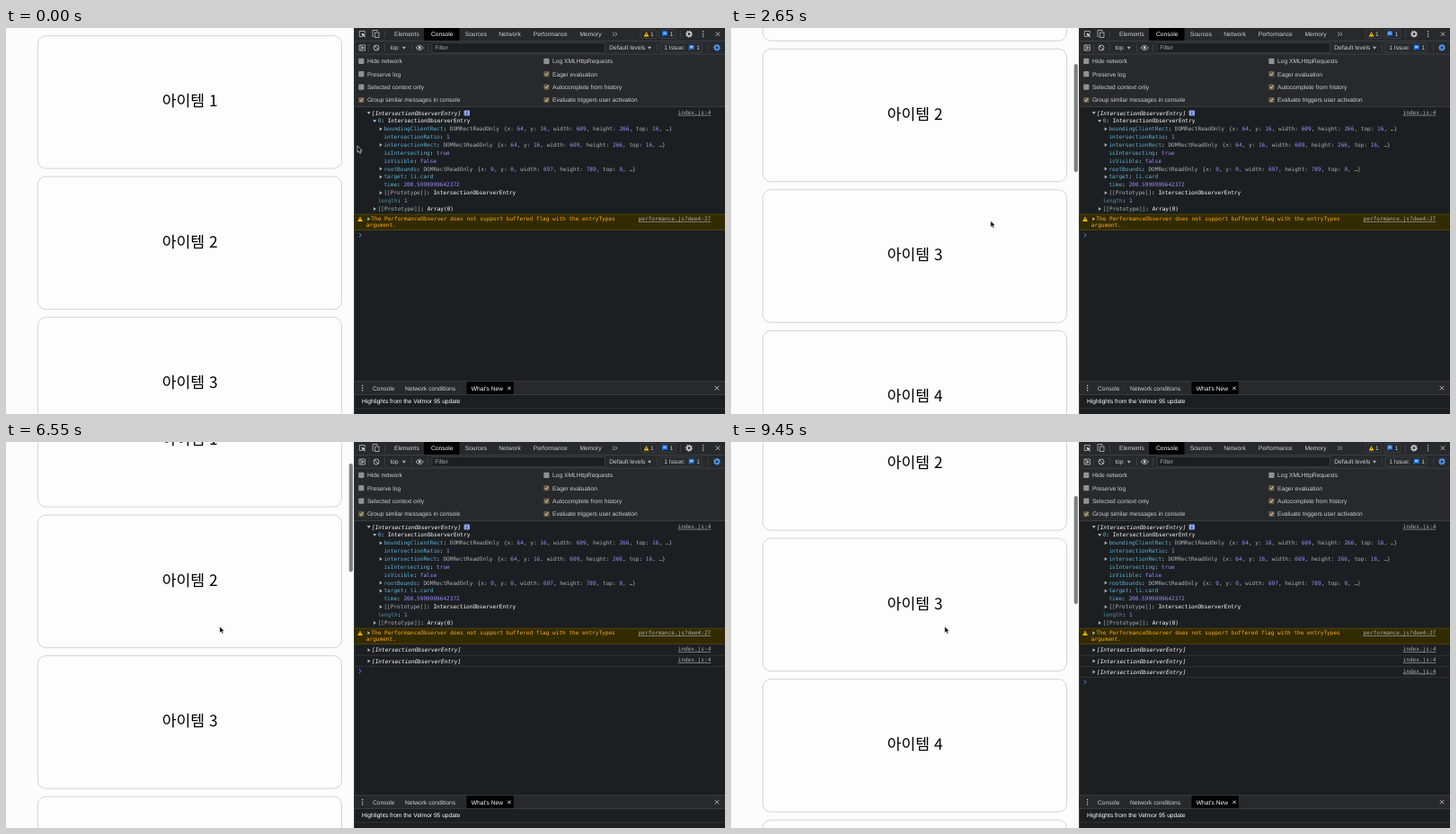
These frames come from a looping animation (800x429 px, 9.5 s). An HTML page:

```html
<!DOCTYPE html>
<html lang="ko">
<head>
<meta charset="utf-8">
<title>Scroll observer demo</title>
<style>
  html, body { margin: 0; width: 100%; height: 100%; overflow: hidden; background: #fcfcfc; }
  svg { display: block; width: 800px; height: 429px; }
  text { white-space: pre; text-rendering: geometricPrecision; }
  .ui { font: 6.66px "Liberation Sans", Arial, sans-serif; }
  .mono { font: 6.106px "DejaVu Sans Mono", Menlo, monospace; }
  .slant { font-style: italic; }
  .label { font: 500 17.2px "Noto Sans CJK KR", "Noto Sans CJK", sans-serif; text-anchor: middle; }
  .link { text-decoration: underline; text-anchor: end; }
</style>
</head>
<body>
<svg id="stage" viewBox="0 0 800 429" xmlns="http://www.w3.org/2000/svg"></svg>
<script>
const LOOP = 9500, STEP = 50;
const PITCH = 156.5, CARD_H = 147.5, GONE_AT = 156;
const ROW = 12.2, LINE = 8.88;
const C = {
  text: '#cdd0d4', white: '#ffffff', dim: '#adb1b6', key: '#5db0d7', faint: '#4c8dab',
  num: '#a18aff', bar: '#27292c', body: '#1c1f21', edge: '#494c50', blue: '#1a73e8',
  warn: '#fba82a', link: '#adb0b4'
};

// Drawing helpers
const rect = (x, y, w, h, fill, more = '') =>
  `<rect x="${x}" y="${y}" width="${w}" height="${h}" fill="${fill}" ${more}/>`;
const path = (d, stroke, width = .8, fill = 'none') =>
  `<path d="${d}" stroke="${stroke}" stroke-width="${width}" fill="${fill}"/>`;
const shape = (d, fill) => `<path d="${d}" fill="${fill}"/>`;
const ui = (x, y, s, fill = C.text) => `<text class="ui" x="${x}" y="${y}" fill="${fill}">${s}</text>`;
const mono = (x, y, s, fill = C.white, style = '') =>
  `<text class="mono ${style}" x="${x}" y="${y}" fill="${fill}">${s}</text>`;
const span = (s, fill, dx = 0) => `<tspan fill="${fill}" dx="${dx}">${s}</tspan>`;
const link = (y, s) => mono(784.3, y, s, C.link, 'link');
const right = (x, y, fill = C.dim) => shape(`M${x - 1.2} ${y - 2}L${x + 1.8} ${y}L${x - 1.2} ${y + 2}Z`, fill);
const down = (x, y, fill = C.dim) => shape(`M${x - 2} ${y - 1.3}H${x + 2}L${x} ${y + 1.7}Z`, fill);
const hline = (y, fill = C.edge) => rect(387.5, y, 412.5, .6, fill);
const vline = (x, y) => rect(x, y, .6, 9, C.edge);
const close = (x, y, r = 2.3, color = C.text) =>
  path(`M${x - r} ${y - r}L${x + r} ${y + r}M${x + r} ${y - r}L${x - r} ${y + r}`, color);
const dots = (x, y) => [-2.6, 0, 2.6].map(d => `<circle cx="${x}" cy="${y + d}" r=".75" fill="${C.text}"/>`).join('');
const ring = (x, y, r, color, width, more = '') =>
  `<circle cx="${x}" cy="${y}" r="${r}" fill="none" stroke="${color}" stroke-width="${width}" ${more}/>`;
const gear = (x, y, color) => ring(x, y, 2.2, color, 1.6) + ring(x, y, 3.4, color, 1.1, 'pathLength="16" stroke-dasharray="1"');
const outline = (x, y, w, h) => rect(x, y, w, h, 'none', `rx="1.2" stroke="${C.edge}" stroke-width=".6"`);
const alertIcon = (x, y, r) => shape(`M${x} ${y - r}L${x + r} ${y + r}H${x - r}Z`, '#fbbc04') +
  rect(x - .4, y - .8, .8, 2, '#4d3a00');
const bubble = (x, y) => shape(`M${x - 3} ${y - 3}h6v5h-4.4l-1.6 1.6z`, C.blue) +
  rect(x - 1.7, y - 1.8, 3.4, .6, '#fff') + rect(x - 1.7, y - .3, 3.4, .6, '#fff');
const check = (x, y, label, on) =>
  rect(x, y - 3.1, 6.2, 6.2, on ? '#6b5d49' : '#8f9194', 'rx="1"') +
  (on ? path(`M${x + 1.4} ${y}l1.4 1.5 2.2-3.2`, '#f0dfc0', .9) : '') +
  ui(x + 9.7, y + 2.3, label);

function cards() {
  let s = '';
  for (let n = 1; n <= 5; n++) {
    const y = 8.6 + (n - 1) * PITCH;
    s += rect(35.4, y, 338.1, CARD_H, '#fdfdfd', 'rx="8.9" stroke="#c9c9c9" stroke-width=".8"') +
      `<text class="label" x="204.6" y="${y + 78.7}" fill="#000">아이템 ${n}</text>`;
  }
  return s;
}

function toolbars() {
  const tabs = [[432, 'Elements'], [473, 'Console'], [510.7, 'Sources'], [548.3, 'Network'],
    [586.7, 'Performance'], [638.5, 'Memory']];
  return rect(387.5, 0, 412.5, 87.5, C.bar) + rect(465, 0, 39.5, 14, '#000') +
    tabs.map(([x, s]) => ui(x, 9, s, s === 'Console' ? C.white : C.text)).join('') +
    path('M675 4.6l2 2.2-2 2.2M677.8 4.6l2 2.2-2 2.2', C.text, .7) +
    path('M396 9.5h-2.7v-6h6v2.7', C.text, .7) + shape('M395.6 5.6l4.6 1.8-1.8.7 1.6 1.8-.8.7-1.6-1.8-.8 1.6z', C.text) +
    vline(421, 2.5) + path('M409.3 9.5h-1.3v-7h5v1.5M410.6 5h4.4v5.5h-4.4z', C.text, .7) +
    outline(706, 1.6, 17.4, 10) + alertIcon(712.5, 6.7, 2.8) + ui(717, 9, '1') +
    outline(726.8, 1.6, 18.4, 10) + bubble(733, 6.4) + ui(738.7, 9, '1') + vline(750, 2.5) +
    gear(760, 6.7, C.text) + dots(775.6, 6.7) + close(792, 6.7) + hline(14.1) +
    // console controls
    path('M393 19h6.5v6h-6.5zM395 19v6', C.text, .7) + shape('M396.2 20.2l2.4 1.8-2.4 1.8z', C.text) +
    vline(403.5, 17.5) + ring(412, 22, 3, C.text, .8) +
    path('M409.9 19.9l4.2 4.2', C.text) + vline(421, 17.5) + ui(427.4, 24.2, 'top') + down(442.8, 22) +
    vline(451, 17.5) + path('M456 22q4.2-5 8.4 0q-4.2 5-8.4 0z', C.text) +
    `<circle cx="460.2" cy="22" r="1.4" fill="${C.text}"/>` + vline(469, 17.5) +
    rect(474, 16.6, 192.5, 10.8, C.body, `stroke="${C.edge}" stroke-width=".6"`) +
    ui(477.2, 24.3, 'Filter', '#a4a7ab') + ui(671.3, 24.2, 'Default levels') + down(716, 22) + vline(724, 17.5) +
    outline(728, 16.8, 46, 10.4) +
    ui(732.3, 24.2, '1 Issue:') + bubble(762.7, 21.8) + ui(768.3, 24.2, '1') + vline(781, 17.5) +
    gear(791, 21.8, '#4f9cf9') + hline(28.8) +
    [['Hide network', 0, 'Log XMLHttpRequests', 0], ['Preserve log', 0, 'Eager evaluation', 1],
      ['Selected context only', 0, 'Autocomplete from history', 1],
      ['Group similar messages in console', 1, 'Evaluate triggers user activation', 1]]
      .map(([a, ca, b, cb], i) => check(392.2, 36.8 + i * 14.4, a, ca) + check(598.3, 36.8 + i * 14.4, b, cb)).join('') +
    hline(87.2);
}

function domRect(values) {
  return span('DOMRectReadOnly ', C.dim) + span('{', C.dim, 1.4) + Object.entries(values)
    .map(([k, v]) => span(k + ': ', C.dim) + span(v, C.num) + span(', ', C.dim)).join('') + span('…}', C.dim);
}

function logTree() {
  const box = domRect({ x: 64, y: 16, width: 609, height: 266, top: 16 });
  const root = domRect({ x: 0, y: 0, width: 697, height: 789, top: 0 });
  // level, arrow, key, key colour, value
  const rows = [
    [1, 'v', '0', C.key, 'IntersectionObserverEntry'],
    [2, '>', 'boundingClientRect', C.key, box],
    [2, '', 'intersectionRatio', C.key, span('1', C.num)],
    [2, '>', 'intersectionRect', C.key, box],
    [2, '', 'isIntersecting', C.key, span('true', C.num)],
    [2, '', 'isVisible', C.key, span('false', C.num)],
    [2, '>', 'rootBounds', C.key, root],
    [2, '>', 'target', C.key, span('li.card', C.key)],
    [2, '', 'time', C.key, span('200.5999999642372', C.num)],
    [2, '>', '[[Prototype]]', C.dim, 'IntersectionObserverEntry'],
    [1, '', 'length', C.faint, span('1', C.num)],
    [1, '>', '[[Prototype]]', C.dim, 'Array(0)']
  ];
  let s = down(403.7, 94.4) + mono(407, 96.5, '[IntersectionObserverEntry]', C.white, 'slant') +
    rect(509.6, 91.4, 6.4, 6, '#8ea4f0', 'rx="1"') + rect(512.4, 92.5, .9, .9, '#26315c') +
    rect(512.4, 94, .9, 2.5, '#26315c') + link(95.8, 'index.js:4');
  rows.forEach(([level, arrow, key, color, value], i) => {
    const x = 406.9 + level * 6.75, y = 103.3 + i * LINE;
    if (arrow) s += (arrow === 'v' ? down : right)(x - 3.5, y);
    s += mono(x, y + 2, span(key, color) + ': ' + value);
  });
  return s;
}

function warning() {
  return rect(387.5, 207, 412.5, 17.4, '#332b00') + hline(206.8, '#665500') + hline(224.2, '#665500') +
    alertIcon(394, 212.2, 2.8) + right(403.5, 212.3) +
    mono(406.3, 214.4, 'The PerformanceObserver does not support buffered flag with the entryTypes', C.warn) +
    mono(400.8, 221.4, 'argument.', C.warn) + link(214.4, 'performance.js?dee4:27');
}

function extraLogs() {
  return [0, 1, 2].map(i => {
    const y = 231.2 + i * ROW;
    return `<g class="log">${right(403.7, y)}${mono(407, y + 2.1, '[IntersectionObserverEntry]', C.white, 'slant')}` +
      `${link(y + 1, 'index.js:4')}${hline(y + 5.6, '#3c3d40')}</g>`;
  }).join('');
}

function drawer() {
  return rect(387.5, 392.7, 412.5, 14.8, C.bar) + hline(392.5) + rect(512.5, 393, 52.3, 14.3, '#000') +
    dots(396.6, 400.2) + ui(408, 402.5, 'Console') + ui(443.9, 402.5, 'Network conditions') +
    ui(517.8, 402.5, "What's New", C.white) + close(560, 400.3, 1.7, C.white) + close(791, 400.2) +
    hline(407.3) + ui(396, 417.3, 'Highlights from the Velmor 95 update', C.white) + hline(422.6, '#3c3d40');
}

document.getElementById('stage').innerHTML =
  rect(0, 0, 388, 429, '#fcfcfc') + `<g id="list">${cards()}</g>` +
  rect(381.7, 0, 4.2, 120.2, '#7f7f7f', 'id="thumb" rx="2.1"') +
  rect(387, 0, 413, 429, C.body) + rect(387, 0, .6, 429, '#55585c') +
  toolbars() + logTree() + warning() + extraLogs() +
  `<g id="prompt">${path('M392.7 228l2.6 2.2-2.6 2.2', '#4a8df0', .9)}</g>` + drawer() +
  `<g id="cursor">${path('M0 0V7.2L1.7 5.7 2.8 8.3 4.1 7.7 3 5.2H5.2Z', '#fff', .6, '#000')}</g>`;

// Motion tables: time, value(s)
const SCROLL = [[500, 0], [950, 30], [2000, 100], [3150, 174], [3300, 178], [5200, 178], [5500, 129],
  [5800, 98], [6150, 84], [7200, 84], [7450, 42], [7750, 15], [8150, 6], [8250, 6], [8550, 90],
  [8850, 172], [9150, 209], [9450, 214.5]];
const THUMB = [[500, 0], [550, 1], [4250, 1], [4550, 0], [5200, 0], [5250, 1], [6550, 1], [6850, 0], [7200, 0], [7250, 1]];
const CURSOR = [[0, 391, 131], [50, 379, 138], [200, 379, 138], [550, 285.8, 213.8], [2300, 285.8, 213.8],
  [3200, 293.7, 215], [4300, 293.7, 215], [5000, 270, 228.8], [5600, 270, 228.8], [6100, 237.8, 205]];

function at(table, t, col = 1) {
  const i = table.findIndex(row => row[0] > t);
  if (i === 0) return table[0][col];
  if (i < 0) return table[table.length - 1][col];
  const a = table[i - 1], b = table[i];
  return a[col] + (b[col] - a[col]) * (t - a[0]) / (b[0] - a[0]);
}

// One entry is logged each time the first card leaves or re-enters the view.
const crossings = [];
for (let t = STEP; t < LOOP; t += STEP) {
  if (at(SCROLL, t) > GONE_AT !== at(SCROLL, t - STEP) > GONE_AT) crossings.push(t);
}

const el = id => document.getElementById(id);
const list = el('list'), thumb = el('thumb'), caret = el('prompt'), cursor = el('cursor');
const logs = document.querySelectorAll('.log');
const move = (node, x, y) => node.setAttribute('transform', `translate(${x} ${y})`);
const start = performance.now();

function draw(now) {
  const t = Math.floor(Math.max(0, now - start) % LOOP / STEP) * STEP;
  const y = at(SCROLL, t), count = crossings.filter(c => c <= t).length;
  move(list, 0, -y);
  thumb.setAttribute('y', 1 + y * .275);
  thumb.setAttribute('opacity', at(THUMB, t));
  logs.forEach((g, i) => g.setAttribute('visibility', i < count ? 'visible' : 'hidden'));
  move(caret, 0, count * ROW);
  move(cursor, at(CURSOR, t, 1), at(CURSOR, t, 2));
  requestAnimationFrame(draw);
}
draw(start);
</script>
</body>
</html>
```
